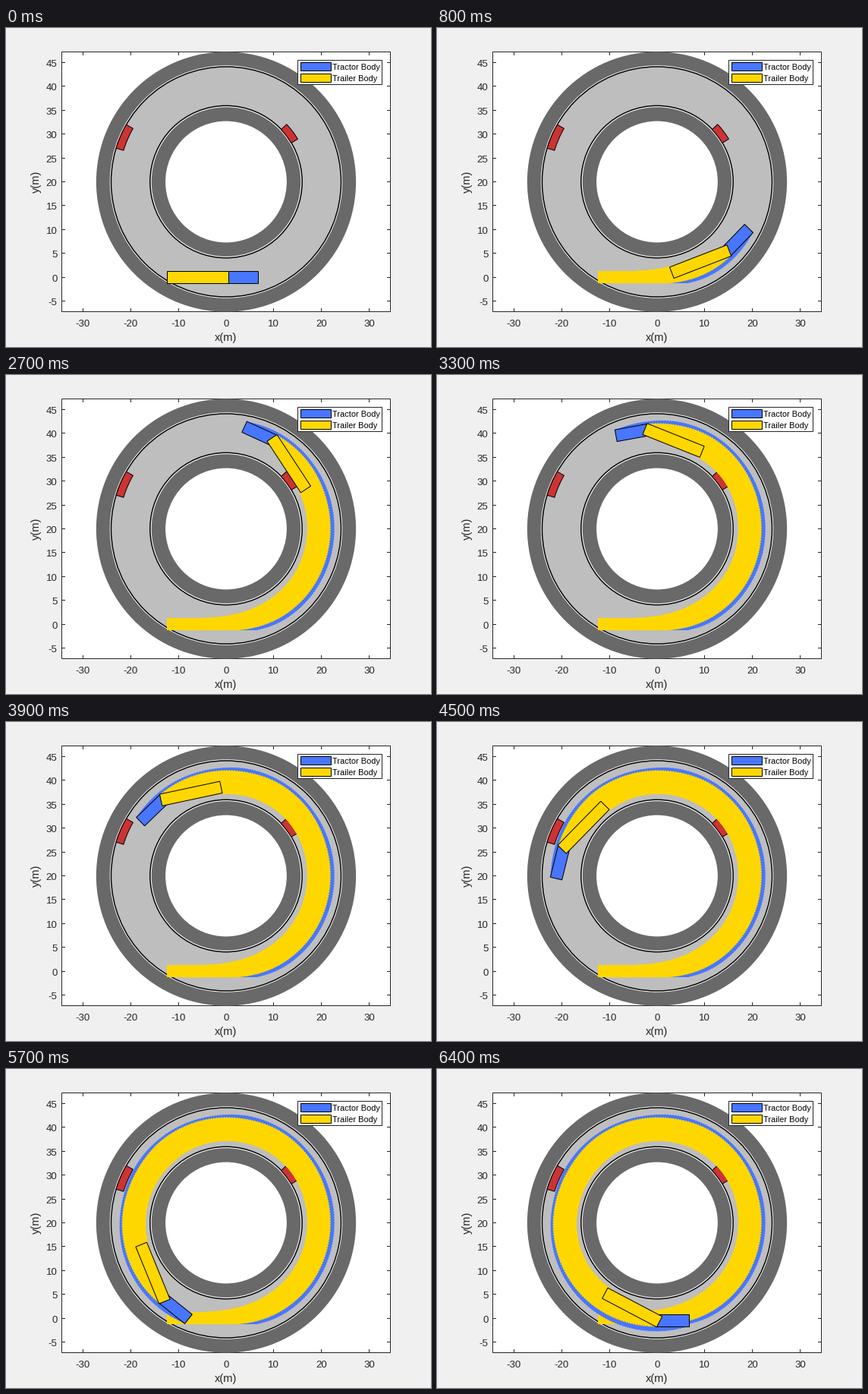
These frames come from a looping animation (560 by 420 pixels, 6.5 s). A matplotlib script:

```python
import numpy as np
import matplotlib.pyplot as plt
from matplotlib.animation import FuncAnimation
from matplotlib.collections import PolyCollection
from matplotlib.patches import Circle, Polygon, Rectangle

W, H, DPI = 560, 420, 70
PT = 72 / DPI                      # points per pixel
CX, CY, SCALE = 290, 202.5, 6.28   # ring centre and pixels per metre
LEFT, RIGHT, TOP, BOTTOM = 73, 506, 31, 373
BLUE, GOLD, RED = "#4876FF", "#FFD700", "#CD3333"
DARK, LIGHT, INK = "#696969", "#BEBEBE", "#262626"
FRAMES, SUB = 65, 4

plt.rcParams["font.family"] = "Liberation Sans"
fig = plt.figure(figsize=(W / DPI, H / DPI), dpi=DPI, facecolor="#F0F0F0")
ax = fig.add_axes([0, 0, 1, 1])
ax.set_xlim(0, W)
ax.set_ylim(H, 0)
ax.axis("off")


def to_px(pts):
    pts = np.asarray(pts)
    return np.stack([CX + pts[..., 0] * SCALE, CY - pts[..., 1] * SCALE], -1)


def disc(radius, color):
    ax.add_patch(Circle((CX, CY), radius * SCALE, fc=color, ec="none"))


def ring_line(radius):
    ax.add_patch(Circle((CX, CY), radius * SCALE, fc="none", ec="black", lw=1.5 * PT))


def rect(x0, y0, x1, y1, fill, edge, z=1):
    ax.add_patch(Rectangle((x0, y0), x1 - x0, y1 - y0, fc=fill, ec=edge,
                           lw=PT, zorder=z))


def label(x, y, text, size, color=INK, z=3, **kw):
    ax.text(x, y, text, fontsize=size * PT, color=color, zorder=z, **kw)


def tick(xs, ys):
    ax.plot(xs, ys, color=INK, lw=PT, zorder=0.6)


def obstacle(r0, r1, a0, a1):
    a = np.radians(np.linspace(a0, a1, 12))
    arc = np.stack([np.cos(a), np.sin(a)], -1)
    pts = np.concatenate([r0 * arc, r1 * arc[::-1]])
    ax.add_patch(Polygon(to_px(pts), fc=RED, ec="black", lw=PT, zorder=1.5))


# Plot area and axes
rect(LEFT, TOP, RIGHT, BOTTOM, "white", INK, 0.5)
for v in range(-30, 31, 10):
    x = int(CX + v * SCALE)
    tick([x, x], [BOTTOM, BOTTOM - 4])
    tick([x, x], [TOP, TOP + 4])
    label(x + 0.4, 393, str(v), 13.3, ha="center", va="baseline")
for v in range(-5, 46, 5):
    y = int(CY - (v - 20) * SCALE)
    tick([LEFT, LEFT + 4], [y, y])
    tick([RIGHT, RIGHT - 4], [y, y])
    label(67.5, y + 6, str(v), 13.3, ha="right", va="baseline")
label(290, 412, "x(m)", 14.67, ha="center", va="baseline")
label(40, 202, "y(m)", 14.67, ha="center", va="center", rotation=90)

# Road
for radius, color in [(27.25, DARK), (24.4, "white"), (24.13, LIGHT),
                      (15.95, "white"), (15.65, DARK), (12.72, "white")]:
    disc(radius, color)
ring_line(24.13)
ring_line(15.95)
obstacle(15.9, 17.5, 30.8, 43.5)
obstacle(22.5, 24.13, 150.2, 163)

# Legend
rect(384, 42, 495, 74, "white", INK, 5)
for y, color, text in [(45, BLUE, "Tractor Body"), (60, GOLD, "Trailer Body")]:
    rect(388, y, 428, y + 11, color, "black", 6)
    label(430.5, y + 10, text, 11, "black", 6, va="baseline")


def smooth(t, keys):
    """Cubic Hermite curve through (time, value) keys."""
    kt, kv = np.array(keys, float).T
    m = np.gradient(kv, kt)
    i = np.clip(np.searchsorted(kt, t, side="right") - 1, 0, len(kt) - 2)
    h = kt[i + 1] - kt[i]
    u = (t - kt[i]) / h
    return ((1 + 2 * u) * (1 - u) ** 2 * kv[i] + u * (1 - u) ** 2 * h * m[i]
            + u * u * (3 - 2 * u) * kv[i + 1] + u * u * (u - 1) * h * m[i + 1])


# Hitch path: one lap at constant angular speed, radius dodging the obstacles
FINE = 20
t = np.arange((FRAMES - 1) * FINE + 1) / FINE
phi = np.radians(-90 + 360 * t / (FRAMES - 1))
radius = smooth(t, [(0, 20), (2, 20.2), (5, 20.5), (8, 20.65), (14, 20.65),
                    (19, 20.7), (24, 21), (27, 21.08), (30, 20.9), (35, 20.8),
                    (39, 20.7), (42, 20.45), (49, 20.6), (56, 20.7), (64, 20.5)])
drift = smooth(t, [(0, 0), (2, -1.5), (5, -0.3), (8, 1), (14, 1), (19, 0.8),
                   (24, 2.2), (27, 3.6), (30, 4.6), (35, 4.6), (39, 4.5),
                   (42, 3.7), (49, 2), (56, 0.8), (64, 0)])
hitch = np.stack([radius * np.cos(phi), radius * np.sin(phi)], -1)
heading = phi + np.pi / 2 + np.radians(drift)

# The trailer axle can only roll along the trailer's own direction
AXLE = 9.8
trail_heading = np.zeros(len(t))
for k, (dx, dy) in enumerate(np.diff(hitch, axis=0)):
    a = trail_heading[k]
    trail_heading[k + 1] = a + (dy * np.cos(a) - dx * np.sin(a)) / AXLE


def body(pos, angle, rear, front, half=1.25):
    c, s = np.cos(angle), np.sin(angle)
    local = np.array([(rear, -half), (front, -half), (front, half), (rear, half)])
    return to_px(pos + local @ np.array([[c, s], [-s, c]]))


swept = []
for k in range(0, len(t), FINE // SUB):
    swept.append(body(hitch[k], heading[k], 0, 6.7))
    swept.append(body(hitch[k], trail_heading[k], -12.35, 0.55))

trail = PolyCollection([], facecolors=[BLUE, GOLD], edgecolors="none", zorder=2)
ax.add_collection(trail, autolim=False)
tractor = Polygon(swept[0], fc=BLUE, ec="black", lw=PT, zorder=3)
trailer = Polygon(swept[1], fc=GOLD, ec="black", lw=PT, zorder=4)
ax.add_patch(tractor)
ax.add_patch(trailer)


def update(frame):
    last = 2 * SUB * frame
    trail.set_verts(swept[:last + 2])
    tractor.set_xy(swept[last])
    trailer.set_xy(swept[last + 1])
    return trail, tractor, trailer


anim = FuncAnimation(fig, update, frames=FRAMES, interval=100,
                     repeat=True, repeat_delay=0, blit=False)
plt.show()
```
